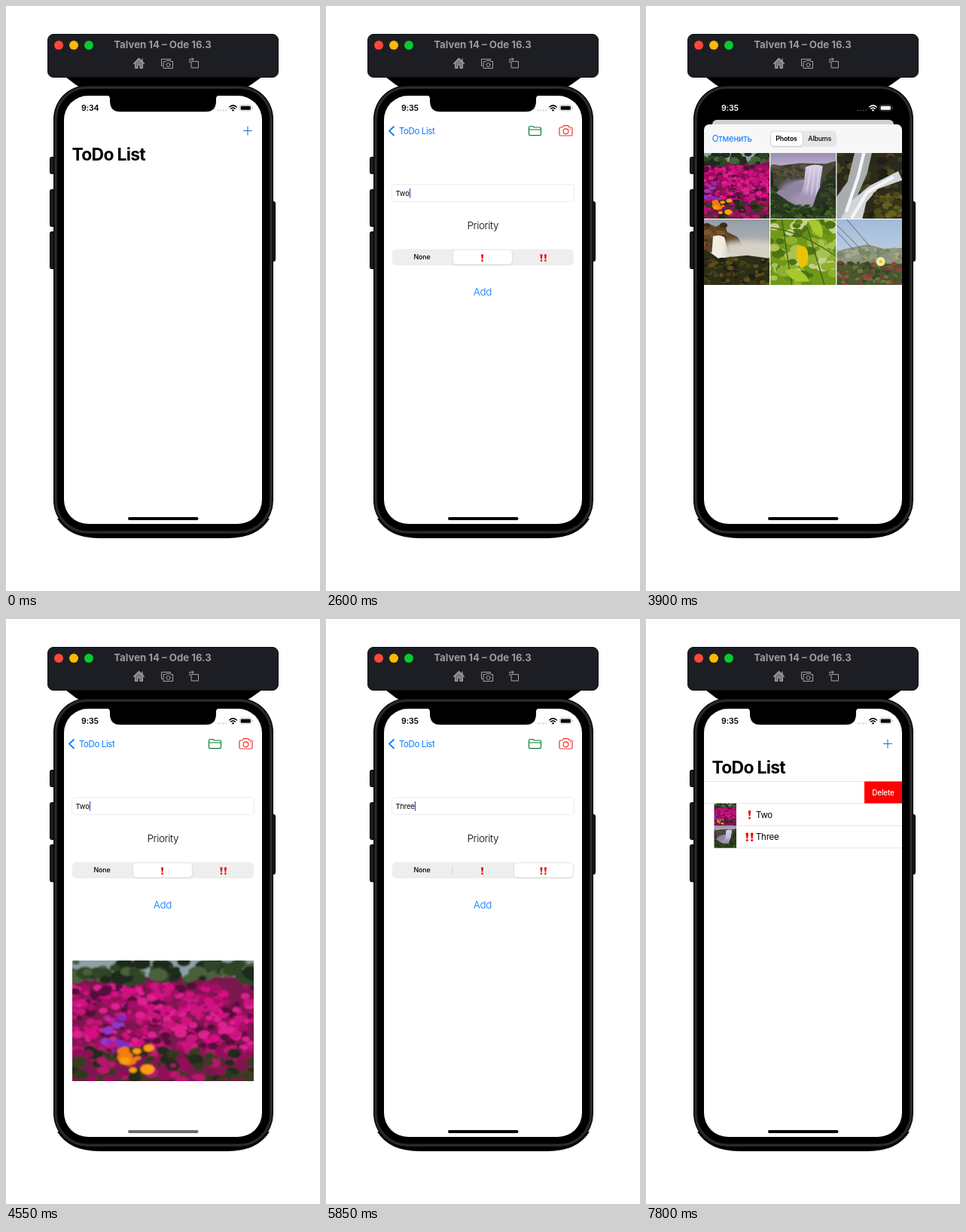
Write an HTML page that moves like this. It is 417 px wide and 776 px high and loops after 8 s.

```html
<!DOCTYPE html>
<html lang="en">
<head>
<meta charset="utf-8">
<title>ToDo List demo</title>
<style>
html, body { margin: 0; width: 100%; height: 100%; overflow: hidden; background: #fff; }
svg { display: block; }
text { font-family: Inter, Roboto, sans-serif; font-optical-sizing: none; white-space: pre; }
.line { fill: none; stroke-linecap: round; stroke-linejoin: round; }
</style>
</head>
<body>
<svg id="stage" width="417" height="776" viewBox="0 0 417 776">
  <defs>
    <clipPath id="glass"><rect x="77" y="119" width="263" height="568" rx="32"/></clipPath>
    <linearGradient id="sky" x2="0" y2="1"><stop stop-color="#8f83a8"/><stop offset=".25" stop-color="#bdb2ce"/><stop offset=".6" stop-color="#8b829c"/></linearGradient>
    <linearGradient id="fall" x2="0" y2="1"><stop stop-color="#d9cfe8"/><stop offset="1" stop-color="#a498b8"/></linearGradient>
    <linearGradient id="dusk" x2="0" y2="1"><stop stop-color="#8f9aa6"/><stop offset="1" stop-color="#ddd3c5"/></linearGradient>
    <linearGradient id="day" x2="0" y2="1"><stop stop-color="#9fb9da"/><stop offset="1" stop-color="#d5dde4"/></linearGradient>
    <filter id="soft" x="-30%" y="-30%" width="160%" height="160%"><feGaussianBlur stdDeviation="7"/></filter>
    <filter id="lens"><feGaussianBlur stdDeviation="1.3"/></filter>
    <filter id="lift" x="-10%" y="-30%" width="120%" height="170%"><feDropShadow dx="0" dy="1" stdDeviation="1" flood-opacity=".16"/></filter>
    <g id="bang"><path d="M-1.9-5Q0-6.4 1.9-5L.8 2H-.8Z"/><circle cy="4.4" r="1.5"/></g>
    <g id="photos"></g>
  </defs>

  <!-- device -->
  <path d="M79 94H340L326 104L318 109H100L92 104Z"/>
  <path d="M68 680Q84 706 124 706H294Q334 706 350 680Z"/>
  <g fill="#1b1b1d" stroke="#000">
    <rect x="58.5" y="200.5" width="8" height="22" rx="2"/>
    <rect x="58.5" y="243.5" width="8" height="49" rx="2"/>
    <rect x="58.5" y="299.5" width="8" height="49" rx="2"/>
    <rect x="350" y="259.5" width="7.5" height="79" rx="2"/>
  </g>
  <rect x="63" y="105" width="292" height="596" rx="45"/>
  <rect x="66" y="108" width="286" height="590" rx="42" fill="none" stroke="#1c1d1e" stroke-width="4"/>
  <rect x="66" y="108" width="286" height="590" rx="42" fill="none" stroke="#303133" stroke-width="1.500"/>

  <!-- toolbar -->
  <rect x="55.500" y="37.500" width="306" height="57" rx="7.500" fill="#1d1e23" stroke="#0e0f11"/>
  <circle cx="70" cy="52" r="6" fill="#fc463d"/>
  <circle cx="90" cy="52" r="6" fill="#ffb900"/>
  <circle cx="110" cy="52" r="6" fill="#05cb2f"/>
  <text x="208" y="56.3" text-anchor="middle" font-size="13.200" font-weight="700" fill="#9b9b9f">Talven 14 – Ode 16.3</text>
  <g class="line" stroke="#a6a6aa">
    <path d="M169.500 76.500L176.500 69.500L183.500 76.500M181 73V70" stroke-width="1.200"/>
    <path d="M171.500 75.500V82.500H175V78H178V82.500H181.500V75.500L176.500 71Z" fill="#77777b"/>
    <path d="M208 79.500H206.500V70.500H218.500V72M209.500 73.500H212L213 72.500H217.500L218.500 73.500H221.500V82.500H209.500Z"/>
    <circle cx="215.500" cy="78" r="2.500"/>
    <path d="M246.500 73.500H255.500V82H246.500ZM244 75V70.500H249M247 68.500L249 70.500L247 72.500"/>
  </g>

  <g id="screen" clip-path="url(#glass)"></g>
  <path d="M134 118.500Q138 119 138 123V126Q138 140.300 152 140.300H265Q279 140.300 279 126V123Q279 119 283 118.500Z"/>
</svg>
<script>
const $ = id => document.getElementById(id);
const BLUE = '#007aff';

const rect = (x, y, w, h, fill, more = '') =>
  `<rect x="${x}" y="${y}" width="${w}" height="${h}" fill="${fill}" ${more}/>`;
const path = (d, fill, more = '') => `<path d="${d}" fill="${fill}" ${more}/>`;
const line = (d, color, width = 1) =>
  `<path class="line" d="${d}" stroke="${color}" stroke-width="${width}"/>`;
const label = (s, x, y, size, { weight = 400, color = '#000', gap = -.02, mid = false } = {}) =>
  `<text x="${x}" y="${y}" font-size="${size}" font-weight="${weight}" fill="${color}"
    letter-spacing="${gap}em" text-anchor="${mid ? 'middle' : 'start'}">${s}</text>`;

// Seeded scatter of small ellipses
function scatter(seed, n, x, y, w, h, r, colors) {
  const rnd = () => (seed = (seed * 16807) % 2147483647) / 2147483647;
  let out = '';
  for (let i = 0; i < n; i++) {
    const size = r * (.5 + rnd());
    out += `<ellipse cx="${(x + rnd() * w).toFixed(1)}" cy="${(y + rnd() * h).toFixed(1)}"
      rx="${size.toFixed(1)}" ry="${(size * .7).toFixed(1)}" fill="${colors[i % colors.length]}"/>`;
  }
  return out;
}

// Landscapes, each 240 x 160, with a margin for the blur
const ground = fill => rect(-10, -10, 260, 180, fill);
const photos = {
  flowers: ground('#7c1450') + rect(-10, -10, 260, 32, '#8da0a6') +
    scatter(11, 80, 0, 2, 240, 26, 9, ['#2d4427', '#49613a', '#1d2c1b']) +
    scatter(23, 420, 0, 32, 240, 92, 5.5, ['#d90f86', '#a80a66', '#dd2090', '#54103a', '#c8127c']) +
    scatter(37, 130, 0, 118, 240, 42, 7, ['#33391f', '#92105a', '#23291a', '#b9126f', '#3a3a22']) +
    scatter(41, 12, 42, 70, 32, 50, 5, ['#7b2ec2', '#9238c9']) +
    scatter(53, 14, 66, 116, 36, 32, 7, ['#ff9d0a', '#f47b08']),
  gorge: ground('url(#sky)') +
    path('M-10 40L70 30L112 25L175 26L205 18L250 0V90L150 80L128 62L100 70L78 90L60 90L-10 95Z', '#4a4738') +
    scatter(61, 60, 45, 32, 82, 30, 5, ['#53503e', '#3b3a2b', '#5c5449']) +
    path('M5 80L12 48L20 32L18 20L28 15L41 21L38 34L46 54L48 84Z', '#29241d') +
    '<ellipse cx="105" cy="98" rx="44" ry="32" fill="#8f85a2" filter="url(#soft)"/>' +
    path('M126 34Q148 24 168 32L162 72L156 122H108L122 75Z', 'url(#fall)', 'filter="url(#lens)"') +
    line('M138 38L128 100M148 35L140 108M160 36L152 100', '#e4daf0', 2) +
    '<ellipse cx="122" cy="114" rx="32" ry="16" fill="#a196b3" filter="url(#soft)"/>' +
    path('M250 0L205 24L178 52L154 98L142 135L250 170Z', '#2b3422') +
    path('M-10 58L32 76L58 100L84 118L118 136L180 124L250 122V170H-10Z', '#2a3b1d') +
    scatter(71, 130, 168, 58, 75, 95, 4.5, ['#364527', '#222b1b', '#3f4f2d']) +
    scatter(83, 190, 0, 128, 240, 34, 4.5, ['#36501f', '#1e2d16', '#486129', '#29421c']) +
    scatter(89, 70, 0, 82, 54, 50, 4.5, ['#395424', '#24351a']),
  stream: ground('#2c2a1b') +
    scatter(97, 110, 0, 0, 240, 160, 9, ['#201f16', '#3f3b20', '#4d4a24', '#2b2819']) +
    path('M86 -10H128L114 50L92 100L88 170H30V120L66 70Z', '#a9adb0', 'filter="url(#lens)"') +
    path('M190 44L200 66L140 88L112 120L100 170H44L72 120L120 80Z', '#d3d6d9') +
    line('M106 0L92 58L64 140M176 60L114 96L78 156', '#f4f5f6', 8) +
    scatter(101, 80, 134, 98, 90, 60, 7, ['#65601d', '#37351a', '#4e4a1b']),
  cliff: ground('url(#dusk)') +
    path('M-10 8L55 12L92 28L122 43L145 80H-10Z', '#5f4326') +
    scatter(127, 50, 0, 14, 96, 50, 7, ['#3d2c1c', '#7a5729', '#57401f']) +
    path('M62 42Q75 36 90 43L104 100H58Z', '#f3ece2') +
    path('M92 56Q160 45 250 65V105H90Z', '#d6d1c6', 'filter="url(#soft)"') +
    path('M-10 65L48 76L75 95L145 88L250 102V170H-10Z', '#2d2c17') +
    scatter(103, 200, 0, 96, 240, 66, 5.5, ['#443f17', '#1e2013', '#5f4d1a', '#2a3016']),
  leaves: ground('#719818') +
    scatter(107, 150, 0, 0, 240, 160, 12, ['#8db02f', '#4d7213', '#a9c252', '#648f16', '#c5d08c']) +
    line('M40 20Q110 28 200 90M68 0L92 160M130 20L172 160', '#416019', 2.5) +
    path('M106 65Q140 58 130 110L116 120Q100 104 106 65Z', '#eac309') +
    path('M135 0Q175 2 166 45Q138 34 135 0ZM76 125Q112 110 136 151Q92 158 76 125Z', '#a6c92c'),
  dunes: ground('url(#day)') +
    path('M-10 94L60 72L115 61L160 73L250 64V170H-10Z', '#89927b') +
    scatter(109, 80, 0, 74, 240, 30, 7, ['#a6a790', '#768768', '#929b78']) +
    rect(-10, 108, 260, 62, '#4d5830') +
    scatter(113, 220, 0, 104, 240, 56, 5, ['#7d3d35', '#43592a', '#69793d', '#8f443c', '#364725']) +
    line('M40 14L96 70M40 30L82 75M64 0L120 65', '#4d5356', 1.5) +
    '<circle cx="147" cy="103" r="11" fill="#f0eca5"/><circle cx="147" cy="103" r="4" fill="#dfc52f"/>'
};
$('photos').innerHTML = Object.entries(photos).map(([name, art]) =>
  `<symbol id="${name}" viewBox="0 0 240 160" preserveAspectRatio="xMidYMid slice"><g filter="url(#lens)">${art}</g></symbol>`).join('');
const photo = (name, x, y, w, h) => `<use href="#${name}" x="${x}" y="${y}" width="${w}" height="${h}"/>`;

// One or two exclamation marks centred on x
function bangs(n, x, y, scale) {
  const offsets = n === 1 ? [0] : n === 2 ? [-3.2, 3.2] : [];
  return offsets.map(dx =>
    `<use href="#bang" fill="#ee0505" transform="translate(${x + dx * scale} ${y}) scale(${scale})"/>`).join('');
}

function status(time, color = '#000', faint = '#c4c4c6') {
  const dots = [282, 285.5, 289, 292.5].map(x => `<circle cx="${x}" cy="138.500" r="1" fill="${faint}"/>`).join('');
  return label(time, 100, 139.3, 10.6, { weight: 600, color, gap: -.01 }) + dots +
    line('M296.800 134Q301.500 129.800 306.200 134M298.800 136.200Q301.500 133.800 304.200 136.200', color, 1.5) +
    `<circle cx="301.500" cy="138.200" r="1.200" fill="${color}"/>` +
    rect(310.5, 131.5, 15.5, 7.5, 'none', `rx="2.300" stroke="${faint}"`) +
    rect(311.7, 132.7, 13.1, 5.1, color, 'rx="1.200"') + rect(327, 134, 1, 2.6, faint);
}

const home = (color = '#000') => rect(162, 678, 93.5, 4, color, 'rx="2"');
const blank = rect(77, 119, 263, 568, '#fff');

const tasks = [
  { name: 'One', level: 0 },
  { name: 'Two', level: 1, image: 'flowers' },
  { name: 'Three', level: 2, image: 'gorge' }
];

function list(count, time, swiped) {
  let out = blank + status(time) + line('M315.500 165.500H326.500M321 160V171', '#1a6fd0', 1.1) +
    label('ToDo List', 87.5, 204.6, 22.9, { weight: 700, gap: -.031 });
  if (count) out += rect(swiped ? 77 : 91, 215, 263, 1, '#e5e5e7');
  tasks.slice(0, count).forEach(({ name, level, image }, i) => {
    const y = 215 + i * 29.6, hidden = swiped && !i;
    out += rect(hidden ? 77 : 91, y + 29, 263, 1, '#e5e5e7');
    if (image) out += photo(image, 90.5, y, 29.5, 29.6);
    if (!hidden) out += label(name, image ? 146 : 90.5, y + 19.2, 11.4);
    out += bangs(level, 137.5, y + 15, 1);
  });
  if (swiped) out += rect(290, 215.5, 50, 29, '#f00') +
    label('Delete', 315, 233.7, 10, { weight: 500, color: '#fff', mid: true });
  return out + home();
}

function form(name, level, { image, time = '9:35', alert = false } = {}) {
  const tint = c => alert ? '#858585' : c;
  const red = tint('#f5302b');
  let out = blank + status(time) +
    line('M90 160L84 165.700L90 171.500', tint(BLUE), 1.8) +
    label('ToDo List', 97, 169.7, 11.4, { color: tint(BLUE), gap: -.03 }) +
    line('M269.500 170V161Q269.500 159.500 271 159.500H274.500L276.500 161H284Q285.500 161 285.500 162.500V170Q285.500 171.700 284 171.700H271Q269.500 171.700 269.500 170ZM269.500 164H285.500', alert ? '#555' : '#0c7a34', 1.2) +
    line('M311.500 161H313.800L315.500 158.700H321.500L323.200 161H325.500Q327 161 327 162.500V170.500Q327 172 325.500 172H311.500Q310 172 310 170.500V162.500Q310 161 311.500 161Z', red, 1.2) +
    `<circle cx="318.500" cy="166.300" r="3.400" class="line" stroke="${red}" stroke-width="1.200"/>` +
    `<circle cx="324.200" cy="163.500" r=".8" fill="${red}"/>` +
    rect(87.5, 236.5, 242, 23, '#fff', 'rx="4" stroke="#ececee"') +
    `<g id="field">${label(name, 92.6, 251.6, 9.4)}</g>` +
    label('Priority', 208.3, 296, 13.5, { weight: 300, gap: -.025, mid: true }) +
    rect(88, 322.5, 241, 21.5, '#eeeeef', 'rx="5.500"');
  if (level !== 1) out += rect(level ? 167.5 : 248, 328, 1, 11, '#d4d4d6');
  out += rect([89, 169, 250][level], 324, 78, 18.5, '#fff', 'rx="4.500" filter="url(#lift)"') +
    label('None', 127.5, 336.4, 8.8, { weight: 500, gap: -.01, mid: true }) +
    bangs(1, 207.5, 334, .85) + bangs(2, 288.7, 334, .85);
  if (!alert) out += label('Add', 208, 383.8, 13.5, { weight: 300, color: BLUE, mid: true });
  if (image) out += photo(image, 88, 453, 241, 160);
  if (alert) out += rect(77, 119, 263, 568, '#000', 'opacity=".2"') +
    rect(117.5, 372.5, 182, 70, '#f0f0f0', 'rx="9"') + rect(117.5, 412, 182, 1, '#d3d3d4') +
    label('Unable to access the camera!', 208.5, 396.7, 11.4, { weight: 600, mid: true }) +
    label('OK', 208.5, 432, 11.4, { weight: 600, color: BLUE, mid: true });
  else out += rect(93, 242, 1.3, 12.5, '#3a55dd', 'id="caret"');
  return out + home(image ? '#6c6c6c' : '#000');
}

function picker() {
  return rect(77, 119, 263, 568, '#000') + status('9:35', '#fff', '#4a4a4c') +
    rect(88, 151, 241, 20, '#d0d0d1', 'rx="6"') +
    rect(77, 157, 263, 60, '#f7f7f8', 'rx="7"') + rect(77, 195, 263, 492, '#fff') +
    label('Отменить', 87.7, 180.4, 11.4, { color: BLUE }) +
    rect(164.5, 165.5, 88.5, 21.5, '#e6e6e8', 'rx="5.500"') +
    rect(166, 167, 41.5, 18.5, '#fff', 'rx="4.500" filter="url(#lift)"') +
    label('Photos', 186.5, 179.4, 8.8, { weight: 600, mid: true }) +
    label('Albums', 230.7, 179.4, 8.8, { weight: 500, mid: true }) +
    Object.keys(photos).map((n, i) => photo(n, 77 + i % 3 * 88.2, 195 + (i > 2) * 88, 87, 87)).join('') + home();
}

const steps = [
  () => list(0, '9:34'),
  () => form('', 0, { time: '9:34' }),
  () => form('One', 0),
  () => list(1, '9:35'),
  () => form('Two', 1),
  () => form('Two', 1, { alert: true }),
  picker,
  () => form('Two', 1, { image: 'flowers' }),
  () => list(2, '9:35'),
  () => form('Three', 2),
  () => form('Three', 2, { image: 'gorge' }),
  () => list(3, '9:35'),
  () => list(3, '9:35', true)
];

const start = performance.now();
let shown = -1;
function draw() {
  const step = Math.floor((performance.now() - start) % 8000 / 650);
  if (step !== shown) {
    shown = step;
    $('screen').innerHTML = steps[step]();
    const caret = $('caret');
    if (caret) caret.setAttribute('x', 92.8 + $('field').firstChild.getComputedTextLength());
  }
  requestAnimationFrame(draw);
}
draw();
</script>
</body>
</html>
```
